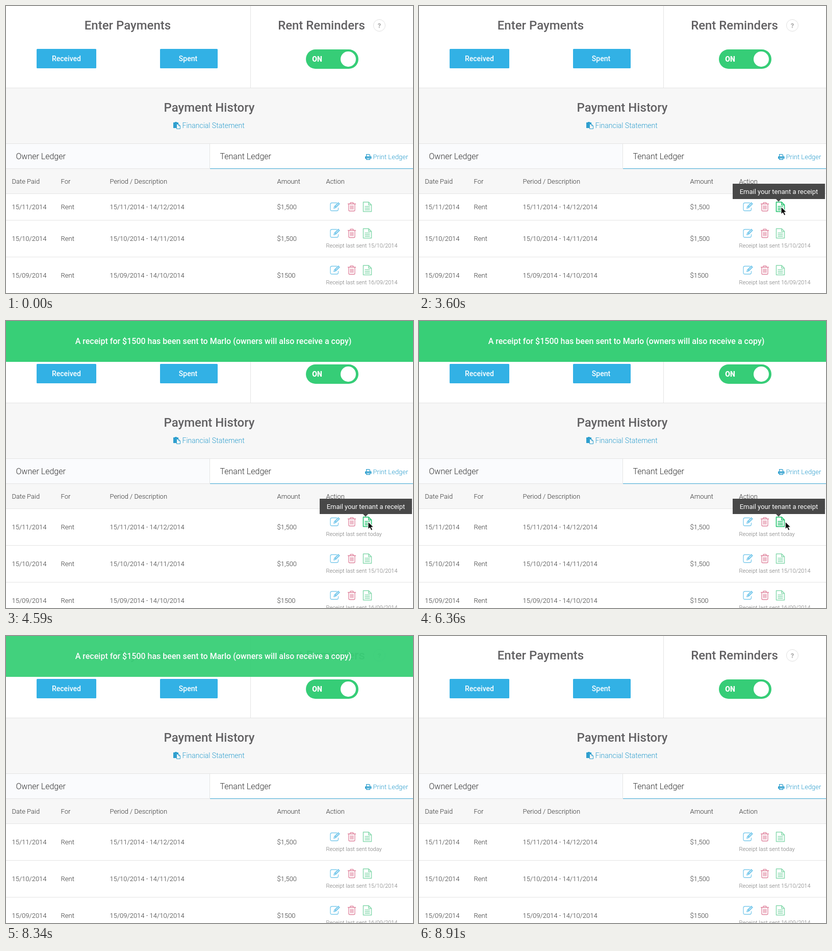
Animation of 798x562 px, one loop 9000 ms. Source, as an HTML page:

```html
<!DOCTYPE html>
<html lang="en">
<head>
<meta charset="utf-8">
<title>Payment ledger</title>
<style>
  html, body { margin: 0; width: 100%; height: 100%; overflow: hidden; background: #fff; }
  svg { display: block; width: 798px; height: 562px; font: 350 13px Roboto, sans-serif; fill: #333; }
  .title { font-size: 24px; font-weight: 500; fill: #626163; text-anchor: middle; }
  .button { font-size: 14px; font-weight: 500; fill: #fff; text-anchor: middle; }
  .tab { font-size: 16px; }
  .link { fill: #2f9fce; }
  .note { font-size: 11px; fill: #777; }
  .rule { fill: none; stroke: #e4e4e4; }
  .edit { stroke: #7ccaec; }
  .bin { stroke: #df839d; }
  .doc { stroke: #88d9ae; }
  .hover { stroke: #2dc675; }
  .icon { fill: none; stroke-width: 1.5; stroke-linejoin: round; }
</style>
</head>
<body>
<svg viewBox="0 0 798 562">
  <defs>
    <g id="actions" class="icon">
      <g class="edit">
        <path d="M649 -7.500H639Q636 -7.500 636 -4.500V5Q636 8 639 8H648.500Q651.500 8 651.500 5V2" stroke-width="1.300"/>
        <path d="M642 4l1-4.500 8.500-8.500 3.500 3.500-8.500 8.500z" fill="#7ccaec" stroke="none"/>
        <path d="M643.500 .5l2 2M647 -1l5-5" stroke="#fff" stroke-width="1"/>
      </g>
      <path class="bin" d="M670 -5.500H686M674.500 -5.500l1-2.700h5l1 2.700M672 -5.500V6.500Q672 8.500 674 8.500H682Q684 8.500 684 6.500V-5.500M675.500 -2.500V5.500M678 -2.500V5.500M680.500 -2.500V5.500" stroke-width="1.300"/>
    </g>
    <path id="sheet" class="icon" d="M701 -9H711L716.500 -3.500V9.500H700.500V-9ZM711 -9V-3.500H716.500M703.500 -.5H713.500M703.500 2.700H713.500M703.500 6H713.500"/>
  </defs>

  <rect width="798" height="562" fill="#fff"/>
  <path class="rule" d="M479.500 0V160"/>
  <text class="title" x="238.500" y="46">Enter Payments</text>
  <text class="title" x="618.500" y="46">Rent Reminders</text>
  <circle cx="732" cy="38" r="11.500" fill="#fff" stroke="#e0e0e0"/>
  <text x="732" y="43" text-anchor="middle" style="font-weight:700;fill:#a5a5a5">?</text>
  <g fill="#32b1e5">
    <rect x="60" y="84" width="117" height="38" rx="1.500"/>
    <rect x="302" y="84" width="113" height="38" rx="1.500"/>
  </g>
  <text class="button" x="118.500" y="108">Received</text>
  <text class="button" x="357" y="108">Spent</text>
  <rect x="588" y="85" width="103" height="38" rx="19" fill="#36cd77"/>
  <circle cx="671" cy="104" r="15" fill="#fff"/>
  <text class="button" x="610" y="109" style="font-weight:900">ON</text>

  <rect y="160" width="798" height="110" fill="#f7f7f7"/>
  <path class="rule" d="M0 160.500H798M0 269.500H798"/>
  <text class="title" x="398.500" y="207">Payment History</text>
  <path d="M328 228h3v-1h4v1h3v3h-4v8h-6z" fill="#2f9fce"/>
  <path d="M334.500 231.500H338.500L341.500 234.500V240.500H334.500ZM338.500 231.500V234.500H341.500" fill="#f7f7f7" stroke="#2f9fce"/>
  <text class="link" x="345.500" y="239" font-size="14">Financial Statement</text>

  <rect y="270" width="400" height="48" fill="#fafbfd"/>
  <rect y="319" width="798" height="48" fill="#f7f7f7"/>
  <path class="rule" d="M0 318.500H399.500V270M0 367.500H798"/>
  <path d="M400 318.500H798" stroke="#3ba5d2"/>
  <text class="tab" x="19.500" y="300">Owner Ledger</text>
  <text class="tab" x="419.500" y="300">Tenant Ledger</text>
  <g fill="none" stroke="#2f9fce" stroke-width="1.300">
    <path d="M706.700 295V290.700H712L713.500 292V295M706.700 297.500H713.500V300.500H706.700Z"/>
    <path d="M705 299V295.500H715.500V299" stroke-width="2"/>
  </g>
  <text class="link" x="719.500" y="300">Print Ledger</text>

  <g id="table"></g>

  <g id="tip">
    <path d="M615 348H796V378H710L705 383L700 378H615Z" fill="#484848"/>
    <text x="705.500" y="368" text-anchor="middle" style="font-weight:400;fill:#fff">Email your tenant a receipt</text>
  </g>
  <g id="banner">
    <rect width="798" height="80" fill="#38cf77"/>
    <text class="button" x="406.500" y="45" style="font-size:16px">A receipt for $1500 has been sent to Marlo (owners will also receive a copy)</text>
  </g>
  <path id="cursor" d="M0 0V15L3.500 11.800L6 17.300L8.700 16.100L6.300 10.800H11Z" fill="#000" stroke="#fff" stroke-width="1.100"/>
</svg>

<script>
const LOOP = 9000, SENT = 3900, FADE = 630;
const $ = id => document.getElementById(id);
const clamp = v => Math.max(0, Math.min(1, v));
const ramp = (t, from, to) => clamp((t - from) / (to - from));
const columns = [11.5, 107.5, 203.5, 531.5, 627.5];
const cells = (values, y) => values.map((v, i) => `<text x="${columns[i]}" y="${y}">${v}</text>`).join('');

const rows = [
  ['15/11/2014', '14/12/2014', '$1,500', 'today'],
  ['15/10/2014', '14/11/2014', '$1,500', '15/10/2014'],
  ['15/09/2014', '14/10/2014', '$1500', '16/09/2014']
];
$('table').innerHTML = cells(['Date Paid', 'For', 'Period / Description', 'Amount', 'Action'], 348) +
  rows.map(([start, end, amount, sent], i) => `<g id="row${i}">
    <g id="cells${i}">${cells([start, 'Rent', `${start} - ${end}`, amount], 40)}</g>
    <use href="#actions" y="25"/><use href="#sheet" class="doc" y="25"/>
    ${i ? '' : '<use id="hover" href="#sheet" class="hover" y="25"/>'}
    <text id="note${i}" class="note" x="627.5" y="53">Receipt last sent ${sent}</text>
    <path id="line${i}" class="rule" d="M0 71.5H798"/></g>`).join('');

const move = (el, x, y) => el.setAttribute('transform', `translate(${x} ${y})`);

// Pointer stops: time, x, y
const path = [
  [240, 797, 510], [1050, 713, 393], [1800, 713, 393], [1950, 710, 393],
  [6330, 710, 393], [6360, 718, 393], [6750, 800, 386]
];
function pointer(t) {
  const i = path.findIndex(p => p[0] > t);
  if (i < 1) return null;
  const [a, b] = [path[i - 1], path[i]];
  const p = ramp(t, a[0], b[0]);
  const e = i === 1 ? 1 - (1 - p) ** 2 : p;
  return [1, 2].map(k => a[k] + (b[k] - a[k]) * e);
}

function draw(t) {
  const sent = t >= SENT;
  const shown = ramp(t, SENT, SENT + FADE);
  rows.forEach((_, i) => move($('row' + i), 0, 368 + i * 72 - (i && !sent ? 20 : 0)));
  move($('cells0'), 0, sent ? 0 : -10);
  move($('line0'), 0, sent ? 0 : -20);
  $('note0').style.opacity = shown;
  $('banner').style.opacity = shown * (1 - ramp(t, 8310, 8910));

  const over = ramp(t, 810, 960) * (1 - ramp(t, 6390, 6540));
  $('tip').style.opacity = $('hover').style.opacity = over;
  const at = pointer(t);
  $('cursor').style.display = at ? '' : 'none';
  if (at) move($('cursor'), ...at);
}

function tick() {
  draw(performance.now() % LOOP);
  requestAnimationFrame(tick);
}
tick();
</script>
</body>
</html>
```
